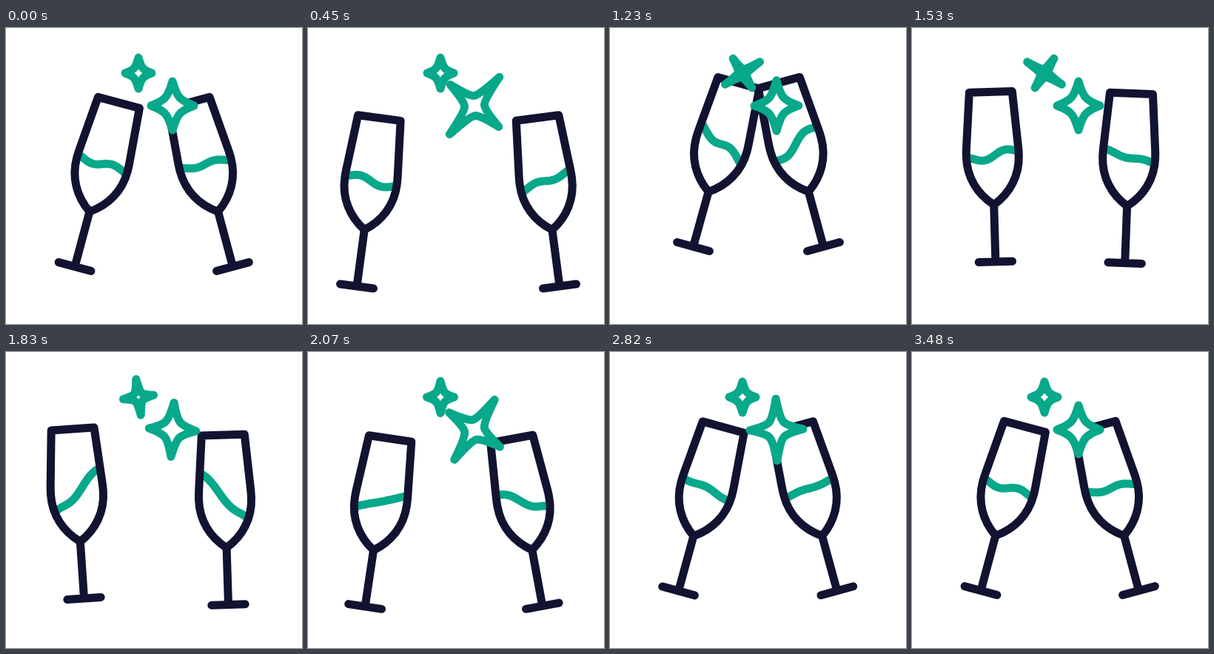
An HTML page with a canvas for the animation above (5.66 s loop, 400 by 400 pixels).

```html
<!DOCTYPE html>
<html lang="en">
<head>
<meta charset="utf-8">
<title>Cheers</title>
<style>
html, body { margin: 0; width: 100%; height: 100%; overflow: hidden; background: #fff; }
canvas { display: block; width: 100%; height: 100%; }
</style>
</head>
<body>
<canvas id="stage"></canvas>
<script>
const LOOP = 5660, STEP = 30, SIZE = 400;
const NAVY = '#121331', GREEN = '#08a88a';
const canvas = document.getElementById('stage');
const ctx = canvas.getContext('2d');
const ratio = window.devicePixelRatio || 1;
canvas.width = canvas.height = SIZE * ratio;

// Pose rows: time, foot x, foot y, tilt in degrees.
// Liquid rows: time, slope, sine part and cosine part of the ripple.
const glasses = [
  {
    pose: [
      [0, 93, 322.5, 15], [450, 66, 349, 7.6], [620, 64.6, 351, 7.2],
      [930, 67.5, 342.5, 12.4], [1140, 75, 327, 15], [1230, 112.5, 295.5, 15.5],
      [1410, 114, 308, 4], [1680, 110, 325, -5.5], [1830, 105.5, 333, -3.85],
      [2080, 77, 344, 9], [2340, 85, 332, 20], [2860, 92.7, 322.8, 15.2],
      [3480, 93, 322.5, 15]
    ],
    liquid: [
      [0, -.05, 3.5, 0], [450, -.16, -3.4, 0], [930, -.37, -4, 0], [1230, -.52, 4.6, 0],
      [1830, .91, 2.4, -3.2], [2340, -.3, -2.4, 3.2], [3480, -.05, 3.5, 0]
    ]
  },
  {
    pose: [
      [0, 306.5, 322.5, -15], [450, 340, 349, -7.5], [620, 341.8, 351, -7.2],
      [930, 339.5, 342.5, -12.4], [1140, 322, 327, -15], [1230, 288.5, 295.5, -15.2],
      [1410, 286, 309, -3.5], [1630, 290.5, 325, 4.5], [1830, 300.5, 341.5, -1.8],
      [2030, 317, 344, -9], [2340, 311.5, 325.5, -18.5], [2860, 306.8, 322.7, -15.2],
      [3480, 306.5, 322.5, -15]
    ],
    liquid: [
      [0, -.05, 2.5, 0], [450, .28, -3, 0], [930, .465, -4, 0], [1230, .56, 4.5, 0],
      [1830, -1.05, -2.4, -3.2], [2340, .22, -3.4, 0], [3480, -.05, 2.5, 0]
    ]
  }
];

const clamp = x => Math.max(0, Math.min(1, x));
const ease = x => (x = clamp(x), x * x * (3 - 2 * x));
const slowEase = x => (x = clamp(x), x * x * x * (x * (6 * x - 15) + 10));
const span = (t, from, to) => (t - from) / (to - from);
const bump = (t, from, peak, to) =>
  t < peak ? ease(span(t, from, peak)) : ease(span(t, to, peak));

// Monotone cubic through the rows, one value per column.
function sample(rows, t) {
  const last = rows.length - 1;
  if (t >= rows[last][0]) return rows[last].slice(1);
  let i = 0;
  while (t >= rows[i + 1][0]) i++;
  const h = rows[i + 1][0] - rows[i][0];
  const u = (t - rows[i][0]) / h;
  return rows[i].slice(1).map((a, k) => {
    const c = k + 1, b = rows[i + 1][c];
    const rate = j => (rows[j + 1][c] - rows[j][c]) / (rows[j + 1][0] - rows[j][0]);
    const tangent = j => {
      if (j === 0 || j === last) return 0;
      const p = rate(j - 1), q = rate(j);
      return p * q > 0 ? 2 * p * q / (p + q) : 0;
    };
    const s = u * u * (3 - 2 * u);
    return a + (b - a) * s
      + h * tangent(i) * u * (1 - u) * (1 - u)
      - h * tangent(i + 1) * u * u * (1 - u);
  });
}

const bowl = new Path2D(
  'M-29-229.5L29-229.5L35-155C35.5-148 35.5-146 35.5-143' +
  'C35.5-115 22-92 0-77C-22-92-35.5-115-35.5-143C-35.5-146-35.5-148-35-155Z');
const stand = new Path2D('M0-77V0M-22.7 0H22.7');

function drawGlass(glass, t) {
  const [x, y, tilt] = sample(glass.pose, t);
  const [slope, a, b] = sample(glass.liquid, t);
  const w = 2 * Math.PI / 54;
  ctx.save();
  ctx.translate(x, y);
  ctx.rotate(tilt * Math.PI / 180);

  ctx.save();
  ctx.clip(bowl);
  ctx.beginPath();
  for (let p = -38; p <= 38; p += 2) {
    ctx.lineTo(p, -(143.5 + slope * p + a * Math.sin(w * p) + b * Math.cos(w * p)));
  }
  ctx.strokeStyle = GREEN;
  ctx.stroke();
  ctx.restore();

  ctx.strokeStyle = NAVY;
  ctx.stroke(bowl);
  ctx.stroke(stand);
  ctx.restore();
}

// Four-pointed star: tall and wide are tip distances, waist the inner corner.
function drawStar(x, y, turn, tall, wide, waist) {
  const c = waist * .5, d = waist * 1.5;
  ctx.save();
  ctx.translate(x, y);
  ctx.rotate(turn * Math.PI);
  ctx.beginPath();
  ctx.moveTo(0, -tall);
  for (const [sx, sy] of [[1, -1], [1, 1], [-1, 1], [-1, -1]]) {
    const toSide = sx * sy < 0;
    const near = [sx * c, sy * d], far = [sx * d, sy * c];
    const [first, second] = toSide ? [near, far] : [far, near];
    ctx.quadraticCurveTo(...first, sx * waist, sy * waist);
    ctx.quadraticCurveTo(...second, toSide ? sx * wide : 0, toSide ? 0 : sy * tall);
  }
  ctx.closePath();
  ctx.fillStyle = '#fff';
  ctx.fill();
  ctx.strokeStyle = GREEN;
  ctx.stroke();
  ctx.restore();
}

function draw(t) {
  ctx.setTransform(ratio, 0, 0, ratio, 0, 0);
  ctx.fillStyle = '#fff';
  ctx.fillRect(0, 0, SIZE, SIZE);
  ctx.lineWidth = 11;
  ctx.lineCap = ctx.lineJoin = 'round';

  glasses.forEach(glass => drawGlass(glass, t));

  const big = bump(t, 0, 660, 1320) + bump(t, 1670, 2330, 3160);
  const bigTurn = slowEase(span(t, 10, 1285)) + slowEase(span(t, 1664, 2940));
  drawStar(225, 105, bigTurn, 33 + 24 * big, 29 + 19 * big, 10.3 - big);

  const small = bump(t, 540, 1380, 2220);
  const smallTurn = ease(span(t, 780, 1980));
  drawStar(179, 61, smallTurn, 21 + 7.5 * small, 18 + 6 * small, 6.3 - 2.7 * small);
}

let start;
function tick(now) {
  if (start === undefined) start = now;
  const t = (now - start) % LOOP;
  draw(Math.floor(t / STEP) * STEP);
  requestAnimationFrame(tick);
}
draw(0);
requestAnimationFrame(tick);
</script>
</body>
</html>
```
